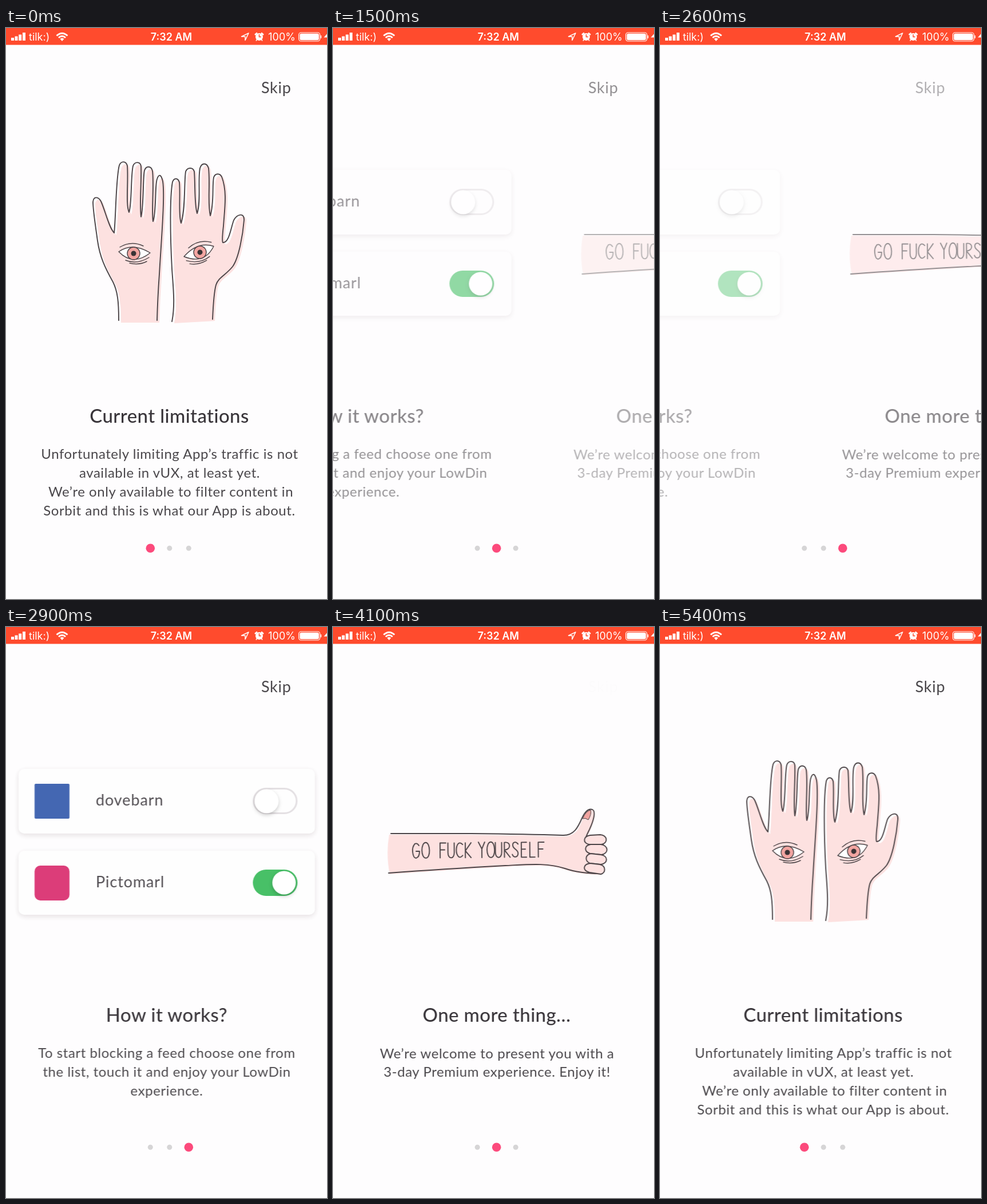
An HTML page for the animation above (5500 ms loop, 561x998 px).

```html
<!DOCTYPE html>
<html lang="en">
<head>
<meta charset="utf-8">
<title>Onboarding</title>
<style>
  html, body { margin: 0; width: 100%; height: 100%; overflow: hidden; background: #fefdfe; }
  svg { display: block; width: 100%; height: 100%; }
  text { font: 24px Lato, "Open Sans", sans-serif; letter-spacing: .55px; fill: #4a474b; }
  .copy text { text-anchor: middle; }
  .copy .title { font-size: 33px; font-weight: 500; letter-spacing: .4px; fill: #39353a; }
  .label { font-size: 27px; letter-spacing: .9px; fill: #504c51; }
  #skip { font-size: 27px; letter-spacing: .7px; }
  .bar text { font: 18px Inter, "Liberation Sans", sans-serif; letter-spacing: 0; fill: #fff; }
  .bar .clock { font-weight: 600; }
  .ink { fill: none; stroke: #4b4447; stroke-width: 1.9; stroke-linecap: round; stroke-linejoin: round; }
  .fine { stroke-width: 1.4; }
  .skin { fill: #fde1e0; }
  .card { fill: #fefefe; filter: drop-shadow(0 3px 5px #50303a24); }
  .knob { fill: #fff; filter: drop-shadow(0 3px 3px #0003); }
</style>
</head>
<body>
<svg viewBox="0 0 561 998" preserveAspectRatio="none">
  <defs>
    <g id="eye" class="ink fine">
      <path fill="#fff" d="M-26-3Q-2-20 29-1Q-1 23-26-3Z"/>
      <circle r="11" fill="#f2a5a1"/>
      <circle r="4.5" fill="#3a3335" stroke="none"/>
      <path d="M-24-11Q-4-23 17-13M-14 12Q6 20 27 7M-7 17Q9 21 23 14"/>
    </g>
    <path id="left" d="M197 511C197 478 195 460 187 444C173 419 164 400 160 372C155 336 152 318 152 304C153 294 161 294 166 303C174 321 180 349 189 358C192 332 192 262 198 240C201 232 210 232 212 241C214 268 209 309 215 322C220 309 218 257 222 241C225 233 235 233 236 242C237 270 233 307 236 330C241 310 239 262 242 249C245 240 254 241 256 250C259 276 254 320 257 338C263 322 260 275 264 264C267 255 271 255 274 268C278 296 271 376 268 430Q265 472 264 511"/>
    <path id="right" d="M290 513C296 483 292 452 290 421C287 366 286 296 291 269C294 261 301 262 303 270C305 294 301 327 306 341C314 316 311 269 314 251C317 243 327 243 329 251C331 277 329 308 334 324C341 304 335 264 339 245C342 235 351 235 354 245C357 274 352 306 357 328C364 307 360 275 363 261C366 253 374 254 377 260C387 286 382 316 380 346Q377 372 379 375C390 376 393 349 398 336C404 325 417 322 416 336C414 361 407 402 396 417C384 432 371 436 367 449Q363 463 361 509"/>
  </defs>

  <g class="page">
    <use href="#left" class="skin" x="4" y="4"/>
    <use href="#right" class="skin" x="4" y="3"/>
    <use href="#left" class="ink"/>
    <use href="#right" class="ink"/>
    <use href="#eye" x="223" y="394"/>
    <use href="#eye" transform="translate(339 392) rotate(-17) scale(-1 1)"/>
    <g class="copy">
      <text class="title" x="285.5" y="690">Current limitations</text>
      <text x="286" y="753">Unfortunately limiting App’s traffic is not</text>
      <text x="286" y="786">available in vUX, at least yet.</text>
      <text x="288" y="819">We’re only available to filter content in</text>
      <text x="285.5" y="852">Sorbit and this is what our App is about.</text>
    </g>
  </g>

  <g class="page">
    <rect class="card" x="26.5" y="248" width="518" height="113" rx="10"/>
    <rect class="card" x="26.5" y="391" width="518" height="112" rx="10"/>
    <rect x="54.5" y="274" width="61" height="61" rx="2" fill="#4266b2"/>
    <rect x="54.5" y="417" width="61" height="61" rx="10" fill="#dc3b78"/>
    <text class="label" x="161.5" y="312">dovebarn</text>
    <text class="label" x="161.5" y="455">Pictomarl</text>
    <rect x="437.5" y="282.5" width="75" height="43" rx="21.5" fill="#fefefe" stroke="#e4e0e3" stroke-width="3"/>
    <circle class="knob" cx="460" cy="304.5" r="21"/>
    <rect x="436" y="424" width="78" height="46" rx="23" fill="#46c066"/>
    <circle class="knob" cx="490.5" cy="447" r="20.5"/>
    <g class="copy">
      <text class="title" x="285.5" y="690">How it works?</text>
      <text x="285.5" y="753">To start blocking a feed choose one from</text>
      <text x="285.5" y="786">the list, touch it and enjoy your LowDin</text>
      <text x="285.5" y="819">experience.</text>
    </g>
  </g>

  <g class="page">
    <path class="skin" d="M97 363Q91 397 98 432Q190 426 300 419C342 417 374 414 404 424Q430 433 468 433L474 366L440 368Q447 364 455 336Q458 320 450 320C440 320 436 336 428 352Q420 366 400 366Q250 362 97 363Z"/>
    <path fill="#f2a5a1" stroke="#4b4447" d="M435 335Q441 321 449 320Q451 327 445 337Q440 333 435 335Z"/>
    <path class="ink" d="M100 361L240 361Q340 362 400 364C420 365 427 350 434 334C440 321 446 317 452 319C459 322 454 339 447 354Q443 362 441 367M96 430Q190 423 300 417C342 415 374 412 404 422Q430 431 468 431"/>
    <g class="ink">
      <path class="skin" d="M448 364L466 363C479 364 480 378 468 380L446 380C435 377 436 366 448 364Z"/>
      <path class="skin" d="M449 380L467 380C481 382 481 396 468 398L448 396C437 392 438 382 449 380Z"/>
      <path class="skin" d="M449 396L467 398C480 400 480 413 467 415L448 413C439 409 439 399 449 396Z"/>
      <path class="skin" d="M448 413L465 415C476 417 476 430 467 432L447 429C434 425 436 415 448 413Z"/>
    </g>
    <g id="tattoo" class="ink" role="img" transform="rotate(-.5 137 390)"></g>
    <g class="copy">
      <text class="title" x="285" y="690">One more thing…</text>
      <text x="285.5" y="754">We’re welcome to present you with a</text>
      <text x="285.5" y="786">3-day Premium experience. Enjoy it!</text>
    </g>
  </g>

  <text id="skip" x="446" y="114">Skip</text>
  <g id="dots"><circle cx="252.3" cy="909.2"/><circle cx="285.8" cy="909.2"/><circle cx="319.3" cy="909.2"/></g>

  <g class="bar">
    <rect width="561" height="29.5" fill="#ff4b2d"/>
    <path stroke="#fff" stroke-width="5" d="M11.5 22V17M18 22V14.5M24.7 22V11.5M31.5 22V8"/>
    <text x="40" y="22">tilk:)</text>
    <g fill="none" stroke="#fff" stroke-width="3">
      <path d="M88.5 13.5Q98 5 107.5 13.5M92 17Q98 11.5 104 17"/>
      <path fill="#fff" stroke="none" d="M94.5 19Q98 16 101.5 19L98 23Z"/>
    </g>
    <text class="clock" x="289" y="22" text-anchor="middle">7:32 AM</text>
    <g fill="none" stroke="#fff" stroke-width="1.5">
      <path stroke-linejoin="round" d="M424 9L411.5 15H418V21.5Z"/>
      <path stroke-width="2.5" d="M435 12L439 8.5M446 8.5L450 12"/>
      <circle cx="442.5" cy="15.5" r="6.5" fill="#fff" stroke="none"/>
      <path stroke="#ff4b2d" d="M442.5 11V15.5H446"/>
      <path d="M438.5 20L437 22.5M446.5 20L448 22.5"/>
      <rect x="511.7" y="8" width="37" height="15" rx="4" stroke-width="1.2"/>
      <rect x="513.5" y="9.8" width="33.4" height="11.4" rx="2.5" fill="#fff" stroke="none"/>
      <path d="M550.5 13V18"/>
      <path fill="#fff" stroke="none" d="M563 8L555.5 16.5H561V23Z"/>
    </g>
    <text x="506" y="22" text-anchor="end">100%</text>
  </g>
</svg>
<script>
const PAGE = 572, LOOP = 5500, STEP = 100;

// Swipes: start, midpoint, steepness, from page, to page, time the dot follows
const swipes = [
  [600, 622, .0172, 0, 1, 1100],
  [1500, 1522, .0172, 1, 2, 2000],
  [2600, 2620, .0172, 2, 1, 3100],
  [3800, 3790, .02, 1, 2, 4300],
  [4800, 4937, .0172, 2, 0, 5400]
];

// Hand lettering on the arm
const strokes = {
  G: 'M12 5Q9 0 5 2Q0 8 1 16Q2 27 7 27Q13 25 13 15H7',
  O: 'M7 0C-2 0-2 27 7 27S15 0 7 0',
  F: 'M1 27V1H11M1 13H9',
  U: 'M0 1V18C0 30 11 30 11 18V1',
  C: 'M11 4C4-4 0 6 0 14S5 31 11 23',
  K: 'M1 1V27M11 1L1 15L11 27',
  Y: 'M0 0L6 12L11 0M6 12V27',
  R: 'M1 27V1C13-1 13 14 1 14L11 27',
  S: 'M10 4C6-2 0 1 1 7S11 14 10 21S2 28 0 22',
  E: 'M10 1H1V27H10M1 13H8',
  L: 'M1 1V27H10'
};
const words = [['GO', 137, 17], ['FUCK', 185, 14.7], ['YOURSELF', 253, 14.8]];
const tattoo = document.getElementById('tattoo');
tattoo.setAttribute('aria-label', words.map(w => w[0]).join(' '));
tattoo.innerHTML = words.map(([word, x, gap]) => [...word].map((c, i) =>
  `<path d="${strokes[c]}" transform="translate(${x + i * gap} 377)"/>`).join('')).join('');

const pages = document.querySelectorAll('.page');
const dots = document.querySelectorAll('#dots circle');
const skip = document.getElementById('skip');
const clamp = v => Math.max(0, Math.min(1, v));

function draw(t) {
  let pos = 0, current = 0;
  for (const [start, mid, rate, from, to, settled] of swipes) {
    if (t >= start) pos = from + (to - from) / (1 + Math.exp((mid - t) * rate));
    if (t >= settled) current = to;
  }
  pages.forEach((page, i) => {
    page.setAttribute('transform', `translate(${(i - pos) * PAGE} 0)`);
    page.setAttribute('opacity', clamp(1 - Math.abs(i - pos)));
  });
  skip.setAttribute('opacity', clamp(2 - pos));
  dots.forEach((dot, i) => {
    dot.setAttribute('r', i === current ? 7.8 : 4.5);
    dot.setAttribute('fill', i === current ? '#fc4a7c' : '#d6d5d6');
  });
}

const origin = performance.now();
function tick() {
  const t = (performance.now() - origin) % LOOP;
  draw(Math.floor(t / STEP) * STEP);
  requestAnimationFrame(tick);
}
tick();
</script>
</body>
</html>
```
